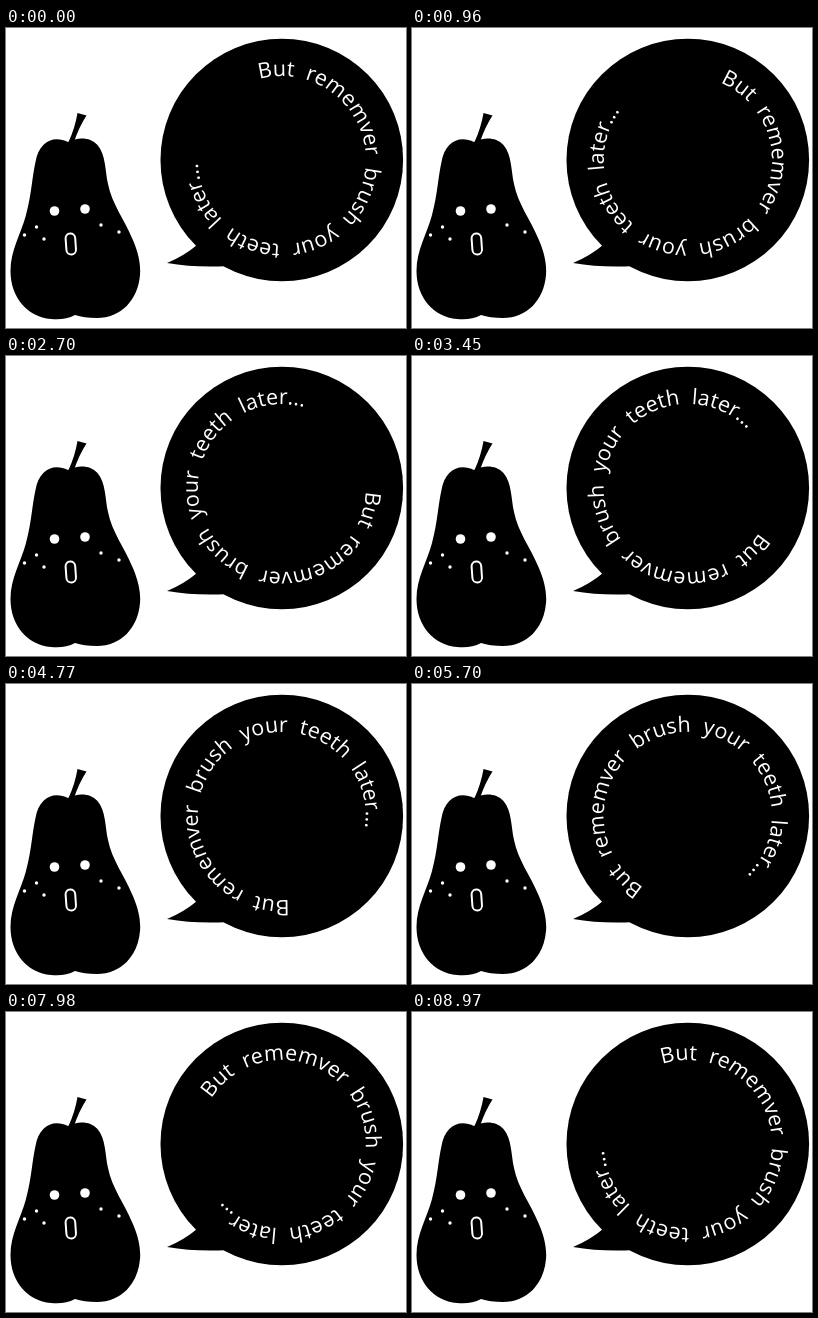
An HTML page for the animation above (9 s loop, 400x300 px).

```html
<!DOCTYPE html>
<html lang="en">
<head>
<meta charset="utf-8">
<title>Pear reminder</title>
<style>
  html, body { margin: 0; width: 100%; height: 100%; overflow: hidden; background: #fff; }
  svg { display: block; width: 400px; height: 300px; }
  text { font: 400 21.5px "Open Sans", "Noto Sans", sans-serif; fill: #fff; white-space: pre; }
</style>
</head>
<body>
<svg viewBox="0 0 400 300">
  <defs>
    <path id="ring" d="M275.8 48 a84 84 0 0 1 0 168 a84 84 0 0 1 0 -168"/>
  </defs>

  <g id="pear">
    <path d="M71.5 85 L80.5 87.5 Q73 99 68 114 L62.5 114 Q69 100 71.5 85Z"/>
    <path d="M62 114 C72 109 84 109 91.5 117 C100 127 99 143 102 156
             C106 176 118 191 126 210 C132 223 135 236 134 247
             C132 272 115 290 91 290 C82 290 75 289 69 287
             C62 291 53 292 45 291 C21 289 4.5 269 4.5 243
             C4.5 222 15 206 20 187 C26 164 26 149 29.5 134
             C33 114 47 107 62 114Z"/>
    <g fill="#fff">
      <circle cx="48.5" cy="183" r="4.8"/>
      <circle cx="79" cy="181" r="4.8"/>
      <circle cx="30.5" cy="199" r="1.7"/>
      <circle cx="18.5" cy="207" r="1.7"/>
      <circle cx="38" cy="211" r="1.7"/>
      <circle cx="95" cy="197" r="1.7"/>
      <circle cx="113" cy="204" r="1.7"/>
    </g>
    <rect x="60" y="205.5" width="9.6" height="21" rx="4.8" transform="rotate(-4 64.8 216)"
          fill="none" stroke="#fff" stroke-width="2"/>
  </g>

  <g id="bubble">
    <circle cx="275.8" cy="132" r="121.3"/>
    <path d="M161 235 Q178 228 191 217 L222 238 Q190 240 161 235Z"/>
  </g>
  <text id="message"><textPath href="#ring">But&#160;&#160;rememver&#160;&#160;brush&#160;&#160;your&#160;&#160;teeth&#160;&#160;later...</textPath></text>
</svg>
<script>
  const LOOP = 9000, STEP = 30, START = -15.5, SWEEP = 359;
  const message = document.getElementById("message");

  function draw(time) {
    const t = Math.floor((time % LOOP) / STEP) * STEP;
    message.setAttribute("transform", `rotate(${START + SWEEP * t / LOOP} 275.8 132)`);
  }

  function tick(now) {
    draw(now);
    requestAnimationFrame(tick);
  }
  draw(0);
  requestAnimationFrame(tick);
</script>
</body>
</html>
```
